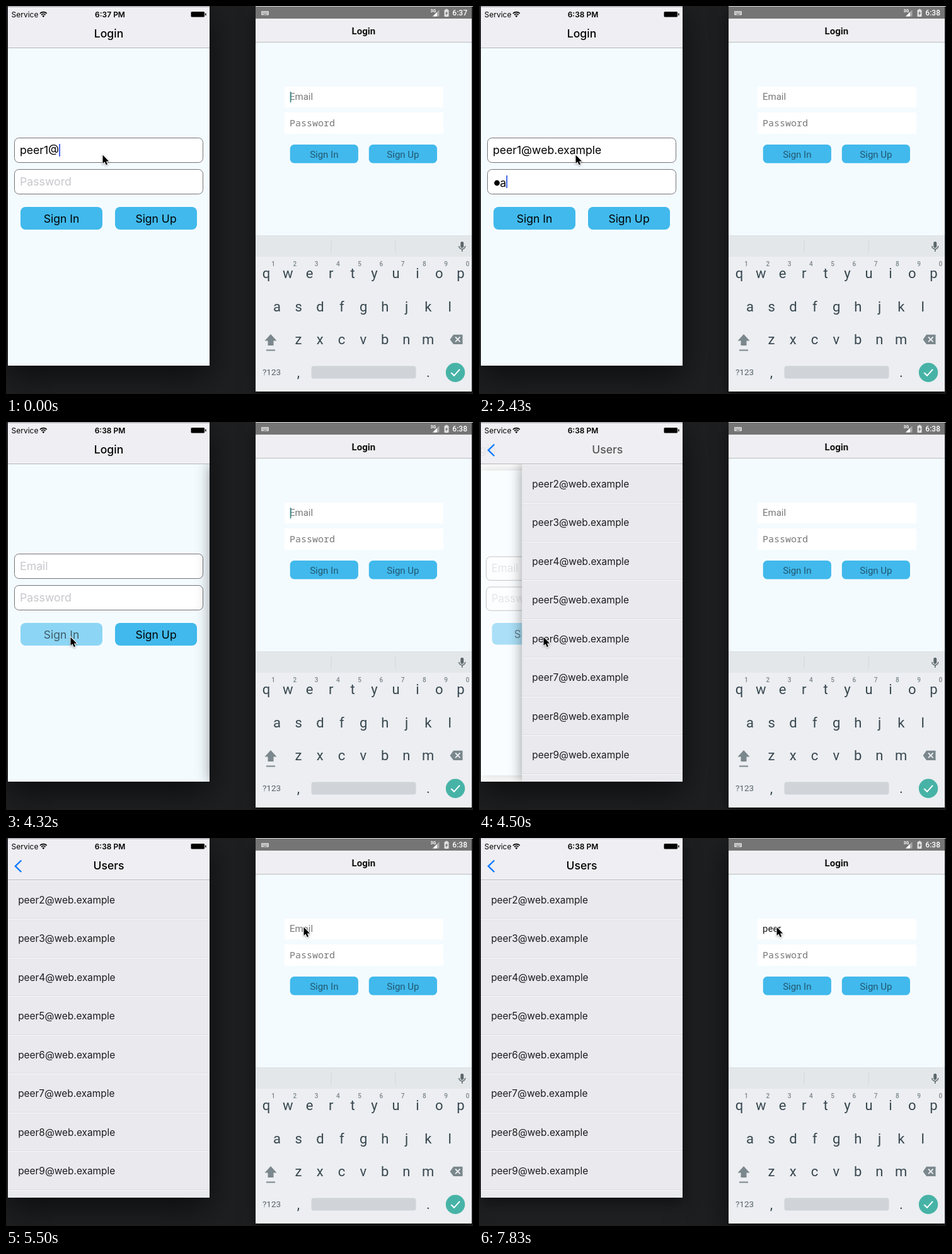
Animation of 741x616 px, one loop 8 s. Source, as an HTML page with a canvas:

```html
<!DOCTYPE html>
<html lang="en">
<head>
<meta charset="utf-8">
<title>Login on two phones</title>
<style>
html, body { margin: 0; width: 100%; height: 100%; overflow: hidden; background: #1d1f21; }
canvas { display: block; width: 741px; height: 616px; }
</style>
</head>
<body>
<canvas id="stage" width="741" height="616"></canvas>
<script>
const ctx = document.getElementById('stage').getContext('2d');
const LOOP = 8000;
const UI = 'Inter, sans-serif';
const ROBOTO = 'Roboto, sans-serif';
const MONO = '"Noto Sans Mono", monospace';
const BLUE = '#41b9ec', PAGE = '#f4fbff', BAR = '#efeef2', HINT = '#c7c7cd', KEY = '#37474f', ICON = '#7a878c';

const DOMAIN = 'web.example';
const EMAIL = 'peer1@' + DOMAIN;
const SECRET = 'password';
const OPEN_AT = 4320;
const SLIDE_AT = 4342;
const FOCUS_AT = 5680;

// Moments at which each character appears.
const emailKeys = [50, 350, 460, 640, 880, 980, 1080, 1190, 1290, 1410, 1530];
const secretKeys = [2190, 2430, 2520, 2610, 2790, 2880, 2970, 3150];
const nameKeys = [6640, 6820, 7290, 7350];
const blinks = [540, 980, 1430, 1890, 2430, 2910, 3420, 3900, 4410, 4910, 5390, 5860, 6340, 6640, 7830];
const pointerPath = [
  [3580, 153, 236], [3680, 146, 250], [3840, 115, 315], [3950, 102, 341],
  [4580, 102, 341], [4700, 147, 309], [5050, 265, 232], [5300, 420, 160], [5500, 472, 141]
];

const passed = (times, t) => times.filter(at => t >= at).length;
const clamp = v => Math.max(0, Math.min(1, v));

function rect(x, y, w, h, color) {
  ctx.fillStyle = color;
  ctx.fillRect(x, y, w, h);
}

function pill(x, y, w, h, r, fill, stroke) {
  ctx.beginPath();
  ctx.roundRect(x, y, w, h, r);
  if (fill) { ctx.fillStyle = fill; ctx.fill(); }
  if (stroke) { ctx.strokeStyle = stroke; ctx.lineWidth = 1; ctx.stroke(); }
}

function poly(points, fill) {
  ctx.beginPath();
  points.forEach(([x, y]) => ctx.lineTo(x, y));
  ctx.closePath();
  if (fill) { ctx.fillStyle = fill; ctx.fill(); }
}

function line(points, color, width) {
  ctx.beginPath();
  points.forEach(([x, y]) => ctx.lineTo(x, y));
  ctx.strokeStyle = color;
  ctx.lineWidth = width;
  ctx.stroke();
}

function disc(x, y, r, color) {
  ctx.beginPath();
  ctx.arc(x, y, r, 0, Math.PI * 2);
  ctx.fillStyle = color;
  ctx.fill();
}

function text(str, x, y, font, color = '#000', align = 'left') {
  ctx.font = font;
  ctx.fillStyle = color;
  ctx.textAlign = align;
  ctx.fillText(str, x, y);
  return ctx.measureText(str).width;
}

function layer(alpha, draw) {
  if (alpha <= 0) return;
  ctx.save();
  ctx.globalAlpha *= alpha;
  draw();
  ctx.restore();
}

function shadowed(color, blur, dy, draw) {
  ctx.save();
  ctx.shadowColor = color;
  ctx.shadowBlur = blur;
  ctx.shadowOffsetY = dy;
  draw();
  ctx.restore();
}

function windowShadow(x, w, h, active) {
  shadowed(`rgba(0,0,0,${active ? 0.6 : 0.5})`, active ? 46 : 22, active ? 16 : 8,
    () => rect(x, 0, w, h, '#000'));
}

// Critically damped spring from 0 to 1.
function slide(t) {
  if (t < SLIDE_AT) return 0;
  const k = (t - SLIDE_AT) * 0.0188;
  return t > 4960 ? 1 : 1 - (1 + k) * Math.exp(-k);
}

function pressOpacity(t) {
  if (t < 4160) return 1;
  if (t < 4250) return 1 - 0.5 * clamp((t - 4130) / 90);
  return 0.5 + 0.5 * clamp((t - 4290) / 210);
}

function iosField(y, hint, filled) {
  pill(13.5, y + 0.5, 299, 39, 7, '#fff', '#747478');
  if (!filled) text(hint, 22, y + 26, `17.7px ${UI}`, HINT);
}

function iosCaret(x, y) { rect(x, y, 2, 20, '#4468ea'); }

function iosSecret(t) {
  const step = 10.75, count = passed(secretKeys, t);
  const last = secretKeys[count - 1];
  const hold = count === 1 ? 60 : count === SECRET.length ? 120 : 1000;
  const reveal = count > 0 && t < last + hold;
  const dots = reveal ? count - 1 : count;
  for (let i = 0; i < dots; i++) disc(28.5 + i * step, 281, 4.4, '#000');
  let end = 22 + dots * step;
  if (reveal) end += text(SECRET[count - 1], end + 0.5, 286.5, `17.6px ${UI}`);
  if (t >= 1890 && t < 3270) iosCaret(end + 0.5, 269);
}

function loginForm(t) {
  const cleared = t >= OPEN_AT;
  rect(3, 67, 320, 504, PAGE);
  iosField(209, 'Email', !cleared);
  iosField(259, 'Password', !cleared && t >= secretKeys[0]);
  if (!cleared) {
    const typed = EMAIL.slice(0, 6 + passed(emailKeys, t));
    const width = text(typed, 22, 235, `17.6px ${UI}`);
    if (t < 1890) iosCaret(22 + width, 219);
    iosSecret(t);
  }
  layer(pressOpacity(t), () => {
    pill(23, 319, 130, 36, 8, BLUE);
    text('Sign In', 88, 344, `17.5px ${UI}`, '#000', 'center');
  });
  pill(173, 319, 130, 36, 8, BLUE);
  text('Sign Up', 238, 344, `17.5px ${UI}`, '#000', 'center');
}

// The page shrinks and fades; only its outer shadow shows around it.
function loginScene(t, p) {
  const k = Math.min(1, p / 0.99);
  const scale = 1 - 0.05 * k, alpha = 1 - 0.7 * k;
  ctx.save();
  ctx.translate(163 - 10 * k, 319);
  ctx.scale(scale, scale);
  ctx.translate(-163, -319);
  layer(alpha, () => shadowed('rgba(0,0,0,0.4)', 18, 0, () => rect(3, 67, 320, 504, '#fff')));
  rect(3, 67, 320, 504, '#fff');
  layer(alpha, () => loginForm(t));
  ctx.restore();
}

function usersScene(t, p) {
  if (t < OPEN_AT) return;
  const x = 3 + 320 * (1 - p);
  shadowed('rgba(0,0,0,0.4)', 20, 0, () => rect(x, 67, 320, 504, '#e9e9ee'));
  for (let i = 0; i < 9; i++) {
    const y = Math.floor(67 + i * 61.5);
    if (i) rect(x, y - 1, 320, 1, '#dcdce0');
    rect(x, y, 320, 1, '#fafafc');
    if (i < 8) text(`peer${i + 2}@${DOMAIN}`, x + 16.2, y + 37, `15.4px ${UI}`, '#1c1c1e');
  }
}

function iosHeader(t, p) {
  rect(3, 0, 320, 66, BAR);
  rect(3, 66, 320, 1, '#b4b4b8');
  const title = `500 17.6px ${UI}`;
  layer((1 - p) ** 2, () => text('Login', 163 - 200 * p, 50, title, '#000', 'center'));
  layer(p ** 2, () => text('Users', 163 + 200 * (1 - p), 50, title, '#000', 'center'));
  layer(Math.min(1, p * 1.25), () => line([[24.3, 35.5], [14.8, 44.7], [24.3, 54]], '#0a7aff', 2.4));

  text('Service', 8.5, 17.5, `12px ${UI}`);
  ctx.strokeStyle = '#000';
  ctx.lineWidth = 1.7;
  for (const r of [4.6, 7.6]) {
    ctx.beginPath();
    ctx.arc(59.3, 17.3, r, -Math.PI * 0.75, -Math.PI * 0.25);
    ctx.stroke();
  }
  poly([[59.3, 18], [57.3, 15.6], [59.3, 14.8], [61.3, 15.6]], '#000');
  text(t < 1350 ? '6:37 PM' : '6:38 PM', 165, 17.5, `600 12px ${UI}`, '#000', 'center');
  pill(293.5, 9, 21.5, 8.5, 1.5, '#000');
  rect(316, 11.5, 1.5, 3.5, '#000');
}

function iosPhone(t) {
  const p = slide(t);
  ctx.save();
  ctx.beginPath();
  ctx.rect(3, 0, 320, 571);
  ctx.clip();
  rect(3, 0, 320, 571, '#fff');
  loginScene(t, p);
  usersScene(t, p);
  iosHeader(t, p);
  rect(3, 0, 320, 2, t < FOCUS_AT ? '#b5b4b7' : '#d6d5d8');
  ctx.restore();
}

function androidStatus(t) {
  rect(396, 0, 343, 20, '#757575');
  rect(396, 0, 345, 1, t < FOCUS_AT ? '#d6d5d8' : '#b5b4b7');
  pill(405, 8, 12, 6.5, 1, '#d8d8d8');
  for (let i = 0; i < 5; i++) {
    rect(406.3 + i * 2, 9.3, 1, 1, '#757575');
    rect(406.3 + i * 2, 11, 1, 1, '#757575');
  }
  rect(408.3, 12.7, 5.4, 1, '#757575');
  text('3G', 673.5, 10, `bold 7px ${ROBOTO}`, '#fff');
  poly([[677, 16.5], [687.5, 16.5], [687.5, 6]], '#a8a8a8');
  poly([[677, 16.5], [684, 16.5], [684, 9.5]], '#fff');
  pill(695.5, 6, 7, 11, 1, '#e4e4e4');
  rect(697.5, 4.8, 3, 2, '#e4e4e4');
  poly([[699.8, 7.5], [696.8, 12.2], [698.6, 12.2], [698.2, 15.5], [701.2, 10.8], [699.4, 10.8]], '#757575');
  text(t < 1710 ? '6:37' : '6:38', 732, 15, `500 12px ${ROBOTO}`, '#fff', 'right');
}

function androidForm(t) {
  rect(396, 57, 343, 308, PAGE);
  rect(396, 20, 343, 37, BAR);
  rect(396, 57, 343, 1, '#babcbf');
  text('Login', 567.3, 45, `bold 15px ${ROBOTO}`, '#111', 'center');
  rect(442, 128, 251.5, 33, '#fff');
  rect(442, 169, 251.5, 34, '#fff');

  const typed = EMAIL.slice(0, passed(nameKeys, t));
  const width = text(typed || 'Email', 450, 149, `15px ${ROBOTO}`, typed ? '#1a1a1a' : '#777');
  text('Password', 450, 190.5, `15px ${MONO}`, '#777');
  if (passed(blinks, t) % 2 === 0) rect(450.7 + (typed ? width : 0), 136, 1.8, 17, '#3d8f8d');

  [['Sign In', 450.7], ['Sign Up', 575.8]].forEach(([label, x]) => {
    pill(x, 220, 108.2, 29.5, 6.5, BLUE);
    text(label, x + 54.1, 241, `15px ${ROBOTO}`, '#22566f', 'center');
  });
}

function keyIcons() {
  poly([[420, 521], [429.5, 531.5], [424.5, 531.5], [424.5, 539], [415.5, 539], [415.5, 531.5], [410.5, 531.5]], ICON);
  rect(413, 545.5, 14, 2, ICON);

  poly([[704.5, 529.5], [710, 521.7], [724.5, 521.7], [724.5, 537], [710, 537]], ICON);
  line([[713, 525.5], [720.5, 533.2]], '#eceff1', 1.8);
  line([[720.5, 525.5], [713, 533.2]], '#eceff1', 1.8);

  disc(713, 581.7, 15.2, '#47b3a7');
  line([[706.3, 582.2], [711, 586.8], [720, 576.8]], '#fff', 2);

  pill(721.2, 374, 5, 10, 2.5, '#5c686d');
  ctx.beginPath();
  ctx.arc(723.7, 381, 5, 0, Math.PI);
  ctx.strokeStyle = '#5c686d';
  ctx.lineWidth = 1.5;
  ctx.stroke();
  rect(723, 386, 1.5, 4, '#5c686d');
}

function keyboard() {
  rect(396, 364, 343, 2, '#dfe5e8');
  rect(396, 366, 343, 32, '#e4e7e9');
  rect(396, 398, 343, 213, '#eceef1');
  rect(396, 611, 343, 1, '#fafafa');
  rect(515.5, 372, 1, 20, '#d2d6d8');
  rect(617.5, 372, 1, 20, '#d2d6d8');

  const pitch = 34.27;
  [['qwertyuiop', 413, 432], ['asdfghjkl', 430, 485], ['zxcvbnm', 464, 537]].forEach(([keys, x, y], row) => {
    [...keys].forEach((key, i) => {
      text(key, x + i * pitch, y, `22px ${ROBOTO}`, KEY, 'center');
      if (row === 0) text((i + 1) % 10, 424 + i * pitch, 413, `500 10px ${ROBOTO}`, '#7b878c', 'center');
    });
  });
  text('?123', 421.5, 586.3, `13.5px ${ROBOTO}`, '#55636a', 'center');
  text(',', 464, 589, `22px ${ROBOTO}`, KEY, 'center');
  text('.', 670, 589, `22px ${ROBOTO}`, KEY, 'center');
  pill(484.5, 571.5, 166, 20, 4, '#d0d4d8');
  keyIcons();
}

function pointer(t) {
  let [, x, y] = pointerPath[0];
  for (let i = 1; i < pointerPath.length; i++) {
    const [t0, x0, y0] = pointerPath[i - 1], [t1, x1, y1] = pointerPath[i];
    if (t < t0) break;
    const k = clamp((t - t0) / (t1 - t0));
    x = x0 + (x1 - x0) * k;
    y = y0 + (y1 - y0) * k;
  }
  ctx.save();
  ctx.translate(x + 0.5, y + 0.5);
  poly([[0, 0], [0, 13.5], [3.1, 10.7], [5.3, 15.8], [7.6, 14.8], [5.4, 9.9], [9.7, 9.9]]);
  ctx.strokeStyle = '#fff';
  ctx.lineWidth = 1.8;
  shadowed('rgba(0,0,0,0.35)', 3, 1, () => ctx.stroke());
  ctx.fillStyle = '#000';
  ctx.fill();
  ctx.restore();
}

function render(t) {
  rect(0, 0, 741, 616, '#1d1f21');
  windowShadow(3, 320, 571, t < FOCUS_AT);
  windowShadow(396, 343, 612, t >= FOCUS_AT);
  iosPhone(t);
  androidForm(t);
  androidStatus(t);
  keyboard();
  pointer(t);
}

let start;
function tick(now) {
  start ??= now;
  render((now - start) % LOOP);
  requestAnimationFrame(tick);
}
render(0);
requestAnimationFrame(tick);
</script>
</body>
</html>
```
